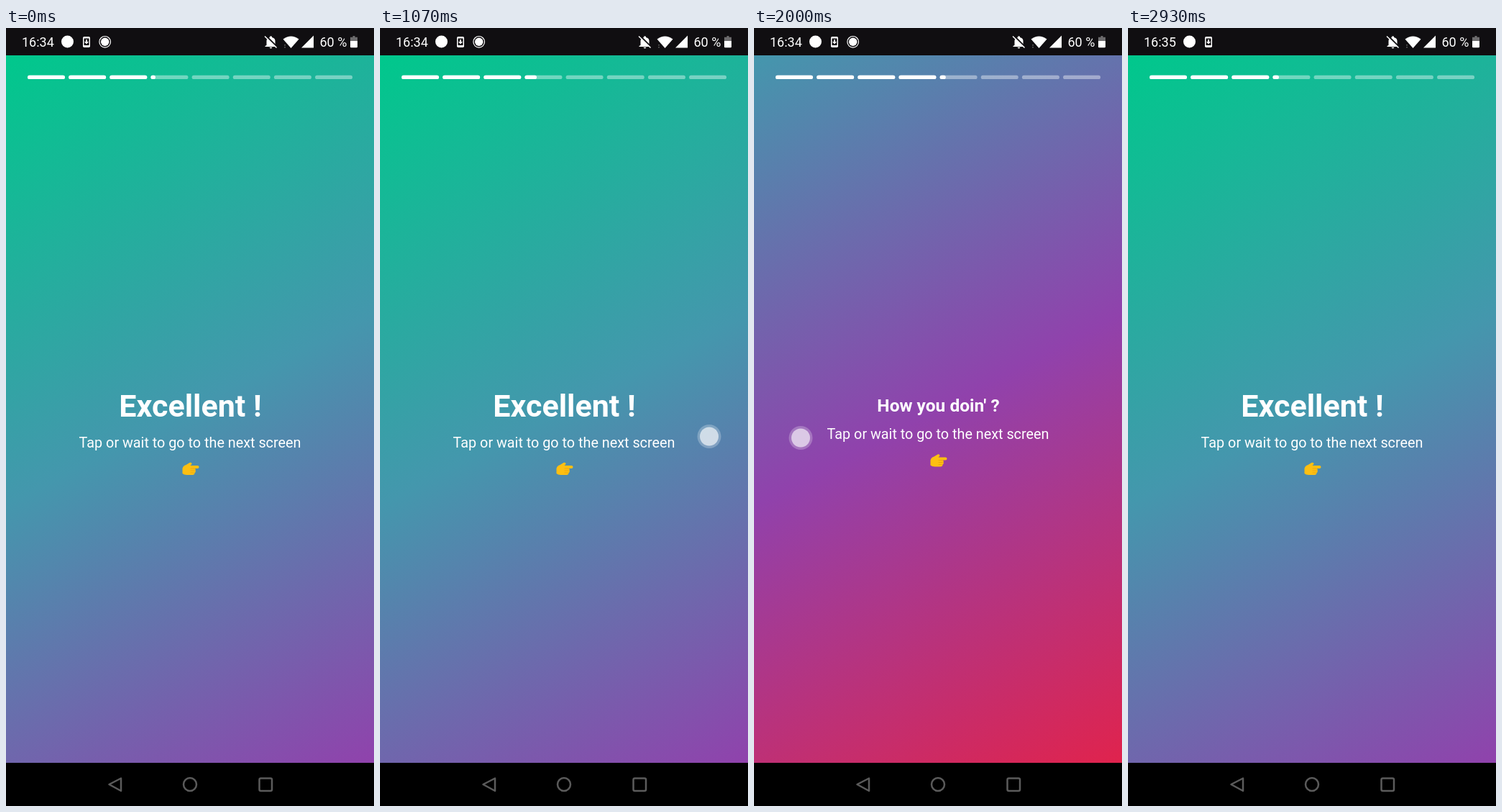
An HTML page for the animation above (2.99 s loop, 512 by 1081 pixels).

```html
<!DOCTYPE html>
<html lang="en">
<head>
<meta charset="utf-8">
<title>Story screens</title>
<style>
  html, body { margin: 0; width: 100%; height: 100%; overflow: hidden; background: #000; }
  svg { display: block; width: 100vw; height: 100vh; }
  text { font-family: Roboto, sans-serif; fill: #fff; }
  .status text { font-size: 18px; }
  .page text { text-anchor: middle; font-size: 19.8px; }
  .page .title { font-weight: 700; }
  .nav { fill: none; stroke: #5b5b5b; stroke-width: 2.5; stroke-linejoin: round; }
</style>
</head>
<body>
<svg viewBox="0 0 512 1081" preserveAspectRatio="none">
  <defs>
    <linearGradient id="cool" gradientUnits="userSpaceOnUse" x1="0" y1="38" x2="512" y2="1021">
      <stop offset="0" stop-color="#00c88c"/>
      <stop offset=".5" stop-color="#4497ad"/>
      <stop offset="1" stop-color="#9042ac"/>
    </linearGradient>
    <linearGradient id="warm" gradientUnits="userSpaceOnUse" x1="0" y1="38" x2="512" y2="1021">
      <stop offset="0" stop-color="#4497ad"/>
      <stop offset=".5" stop-color="#9042ac"/>
      <stop offset="1" stop-color="#e0234d"/>
    </linearGradient>
    <g id="hand">
      <path fill="#fdbf12" d="M-11-1Q-10-5-6-6L-1-9Q2-10 2-7L0-5H10Q12-5 12-3T10-1H6Q8 0 7 2Q8 4 6 5Q6 8 3 8H-5Q-9 8-11 6Z"/>
      <path fill="none" stroke="#e79b0c" stroke-width=".7" d="M0-1H6M0 2H6M0 5H5"/>
    </g>
  </defs>

  <rect width="512" height="1081"/>

  <g class="page" id="excellent">
    <rect y="38" width="512" height="983" fill="url(#cool)"/>
    <text class="title" x="256.5" y="540" style="font-size:43px">Excellent !</text>
    <text x="256" y="582.5">Tap or wait to go to the next screen</text>
    <use href="#hand" x="256.5" y="613"/>
  </g>
  <g class="page" id="doing">
    <rect y="38" width="512" height="983" fill="url(#warm)"/>
    <text class="title" x="256.5" y="532.5" style="font-size:24.5px">How you doin' ?</text>
    <text x="256" y="571">Tap or wait to go to the next screen</text>
    <use href="#hand" x="256.5" y="601.5"/>
  </g>

  <g id="bars" fill="#fff"></g>

  <g id="touch" fill="#fff">
    <circle r="16.5" opacity=".35"/>
    <circle r="13"/>
  </g>

  <g class="status" fill="#fff">
    <rect width="512" height="38" fill="#100e11"/>
    <text id="clock" x="22" y="26">16:34</text>
    <circle cx="85.5" cy="19" r="8.5"/>
    <rect x="107" y="12" width="10" height="15" rx="1.8"/>
    <path fill="#100e11" d="M108.5 14.5h7v9.5h-7z"/>
    <path d="M111 16h2v3h2l-3 3.5-3-3.5h2z"/>
    <g id="record">
      <circle r="7.8" fill="none" stroke="#fff" stroke-width="1.2"/>
      <circle r="5.7"/>
    </g>
    <g transform="translate(368.5 19)">
      <path d="M-6 5V-1Q-6-5-1.5-6V-7.5h3V-6Q6-5 6-1V4L8 6V7H-8V6ZM-2 7.8H2Q1.5 9.5 0 9.5T-2 7.8Z"/>
      <path fill="none" stroke="#100e11" stroke-width="2" d="M-7-8.5 9 7.5"/>
      <path fill="none" stroke="#fff" stroke-width="1.5" d="M-8.5-7.5 8 8.5"/>
    </g>
    <path d="M385.5 15.5Q396.5 7.5 407.5 15.5L396.5 28Z"/>
    <path d="M411 27.5 428 10.5V27.5Z"/>
    <path fill="#555" d="M387 23h2v1.5h-2zM387 26h2v1.5h-2z"/>
    <text x="436.5" y="26">60 %</text>
    <path fill="#6c6b6d" d="M482.5 11h3v1.8h3.5V18h-10v-5.2h3.5z"/>
    <path d="M479 18h10v8q0 1.3-1.3 1.3h-7.4q-1.3 0-1.3-1.3z"/>
  </g>

  <g class="nav">
    <path d="M143.5 1051 160 1042.5V1060Z"/>
    <circle cx="256" cy="1051" r="9"/>
    <rect x="352.5" y="1042.5" width="17.5" height="17.5" rx="2"/>
  </g>
</svg>
<script>
const LOOP = 2990, STEP = 200 / 3;
const BAR = { x: 30, pitch: 57.15, width: 52, speed: 0.0094 };
const $ = id => document.getElementById(id);

// Each page: start time, its bar, and the bar's fill at the start.
const pages = [
  { at: 0, id: 'excellent', bar: 3, fill: 6.5 },
  { at: 1130, id: 'doing', bar: 4, fill: 0 },
  { at: 2070, id: 'excellent', bar: 3, fill: 0.4 }
];
// Each tap: position and [time, opacity] steps.
const taps = [
  { x: 458, y: 567.5, steps: [[1000, .72], [1070, .72], [1130, .46], [1200, 0]] },
  { x: 65, y: 569.5, steps: [[1930, .7], [2000, .7], [2070, .45], [2130, .2], [2200, 0]] }
];

function addBar(x, opacity) {
  const bar = document.createElementNS('http://www.w3.org/2000/svg', 'rect');
  const attrs = { x, y: 65.8, width: BAR.width, height: 5.2, rx: 2.6, opacity };
  for (const name in attrs) bar.setAttribute(name, attrs[name]);
  return $('bars').appendChild(bar);
}
const fills = Array.from({ length: 8 }, (_, i) => {
  const x = BAR.x + i * BAR.pitch;
  addBar(x, .4);
  return addBar(x, 1);
});

const lastStarted = (list, time, start) => list.filter(item => start(item) <= time).pop();

function draw(t) {
  const page = lastStarted(pages, t, p => p.at);
  for (const id of ['excellent', 'doing']) {
    $(id).style.display = id === page.id ? '' : 'none';
  }
  const filled = page.fill + (t - page.at) * BAR.speed;
  fills.forEach((bar, i) => {
    bar.setAttribute('width', i < page.bar ? BAR.width : i === page.bar ? filled : 0);
  });

  const tap = lastStarted(taps, t, p => p.steps[0][0]);
  $('touch').setAttribute('opacity', tap ? lastStarted(tap.steps, t, s => s[0])[1] : 0);
  if (tap) $('touch').setAttribute('transform', `translate(${tap.x} ${tap.y})`);

  const size = 1 - Math.min(1, Math.max(0, (t - 2045) / 200));
  $('record').setAttribute('transform', `translate(137.7 19.3) scale(${size})`);
  $('record').setAttribute('opacity', size);
  $('clock').textContent = t < 2400 ? '16:34' : '16:35';
}

function tick() {
  const t = performance.now() % LOOP;
  const step = Math.floor((t + 3.34) / STEP);
  draw(Math.round(step * STEP / 10) * 10);
  requestAnimationFrame(tick);
}
tick();
</script>
</body>
</html>
```
